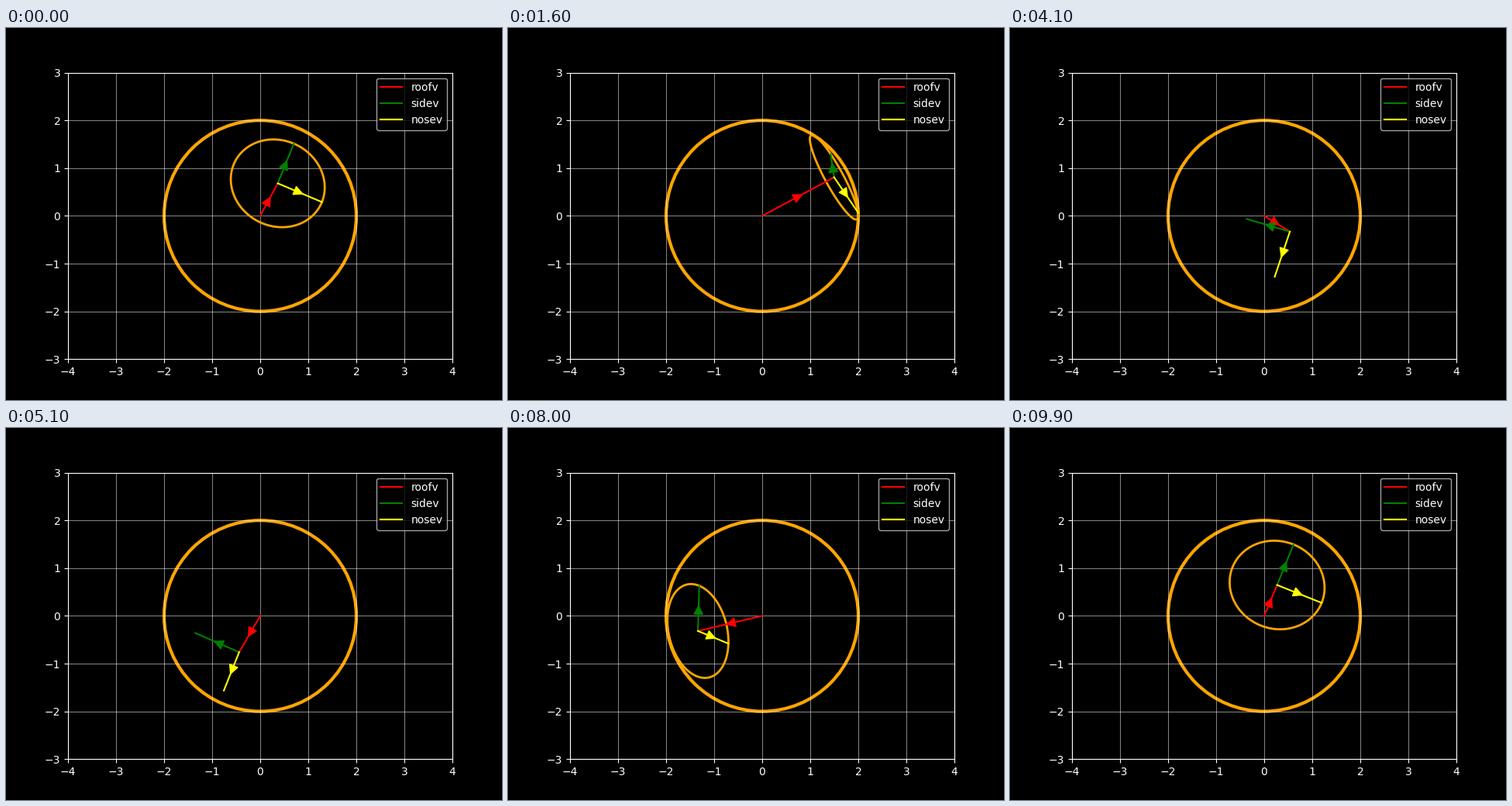
Recreate the animation shown at these times as a matplotlib script. Size 640x480 px, loop 10 s.

```python
import numpy as np
import matplotlib.pyplot as plt
from matplotlib.animation import FuncAnimation
from matplotlib.patches import Circle, FancyArrowPatch

FRAMES = 100
RADIUS = 2.0
HEIGHT = np.sqrt(3)  # distance from the centre to the unit ring on the sphere
TILT = 0.0157        # small angle between the roof and its plane of rotation


def unit(v):
    return v / np.linalg.norm(v)


AXIS = unit(np.array([-0.417, 0.859, -0.297]))
START = np.array([0.2045, 0.407, 0.890])
START = unit(START - START.dot(AXIS) * AXIS)
AHEAD = np.cross(AXIS, START)


def body(k):
    """Roof, side and nose directions after k steps about the fixed axis."""
    a = 2 * np.pi * k / FRAMES
    up = np.cos(a) * START + np.sin(a) * AHEAD
    heading = np.cos(a) * AHEAD - np.sin(a) * START
    roof = np.cos(TILT) * up - np.sin(TILT) * AXIS
    across = np.cos(TILT) * AXIS + np.sin(TILT) * up
    side = (heading + across) / np.sqrt(2)
    nose = (heading - across) / np.sqrt(2)
    return roof, side, nose


class Arrow:
    """A line with an arrowhead just past its middle."""

    def __init__(self, ax, color, label):
        self.line, = ax.plot([], [], color=color, lw=1.5, label=label)
        self.head = FancyArrowPatch((0, 0), (1, 0), arrowstyle="-|>",
                                    mutation_scale=20, color=color, lw=1,
                                    shrinkA=0, shrinkB=0, zorder=3)
        ax.add_patch(self.head)

    def place(self, start, vec):
        start, vec = start[:2], vec[:2]
        end, mid = start + vec, start + vec / 2
        self.line.set_data([start[0], end[0]], [start[1], end[1]])
        tip = mid + 0.038 * vec + 0.048 * unit(vec)
        self.head.set_positions(mid, tip)


plt.style.use("dark_background")
fig, ax = plt.subplots(figsize=(6.4, 4.8), dpi=100)
ax.set_xlim(-4, 4)
ax.set_ylim(-3, 3)
ax.grid(alpha=0.5)
ax.add_patch(Circle((0, 0), RADIUS, fill=False, ec="orange", lw=3))
ring, = ax.plot([], [], color="orange", lw=2)
arrows = [Arrow(ax, c, n) for c, n in
          (("red", "roofv"), ("green", "sidev"), ("yellow", "nosev"))]
ax.legend(loc="upper right")

turn = np.linspace(0, 2 * np.pi, 120)[:, None]


def update(k):
    roof, side, nose = body(k)
    top = HEIGHT * roof
    pts = top + np.cos(turn) * side + np.sin(turn) * nose
    ring.set_data(pts[:, 0], pts[:, 1])
    ring.set_visible(bool(roof[2] > 0))
    arrows[0].place(np.zeros(3), top)
    arrows[1].place(top, side)
    arrows[2].place(top, nose)
    return [ring]


anim = FuncAnimation(fig, update, frames=FRAMES, interval=100,
                     repeat=True, repeat_delay=0, blit=False)
plt.show()
```
